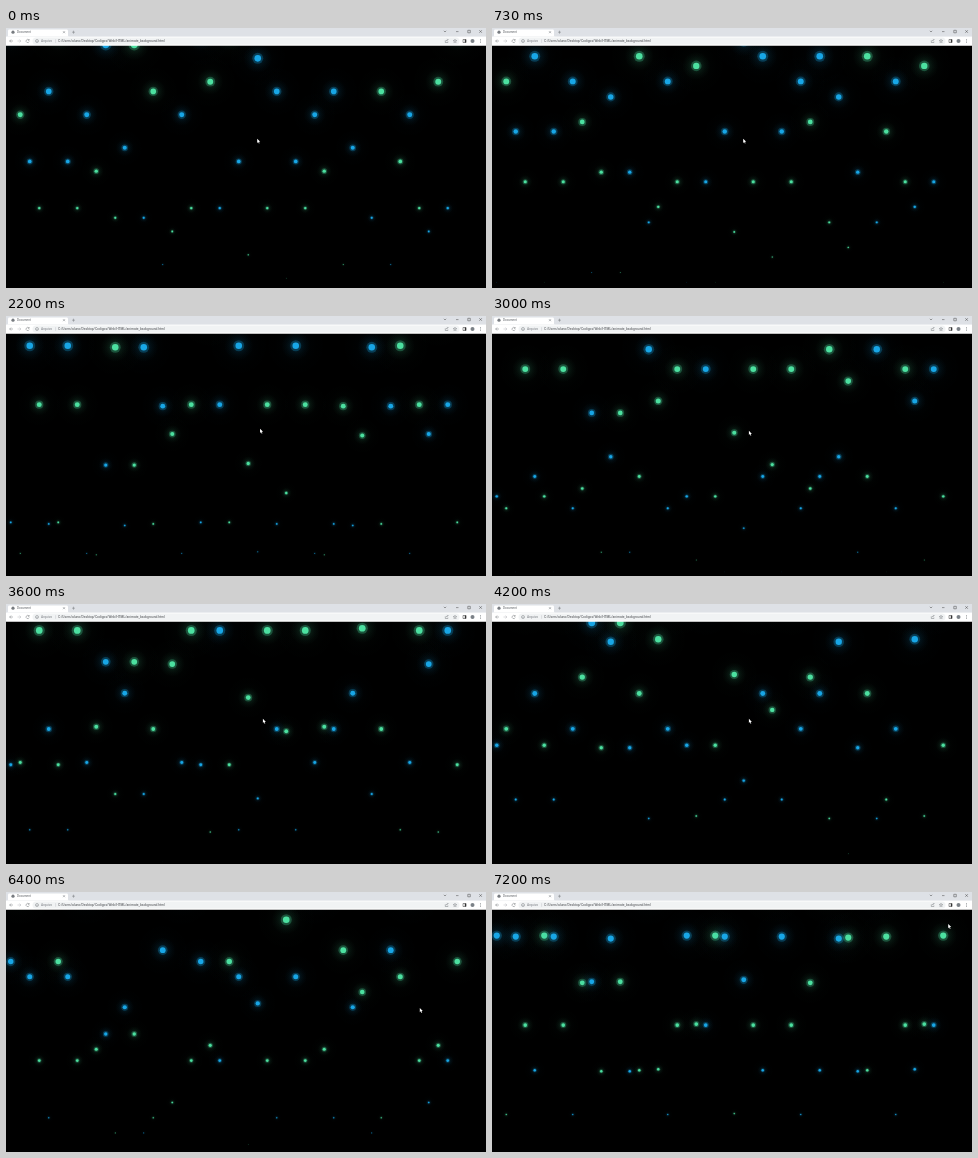
An HTML page with a canvas that plays this animation: 480 px wide and 260 px high, repeating every 7270 ms.

```html
<!DOCTYPE html>
<html lang="pt">
<head>
<meta charset="utf-8">
<title>Document</title>
<style>
  html, body { margin: 0; width: 100%; height: 100%; overflow: hidden; background: #000; }
  canvas, svg { position: absolute; left: 0; top: 0; display: block; }
  text { font-family: Roboto, "Open Sans", sans-serif; }
  .line { fill: none; stroke: #74787c; stroke-width: .5; }
</style>
</head>
<body>
<canvas id="stage" width="480" height="260"></canvas>
<svg width="480" height="18" viewBox="0 0 480 18">
  <rect width="480" height="17.75" fill="#fff"/>
  <rect width="480" height="8.6" fill="#dee1e6"/>
  <path d="M1 8.6Q2 8.6 2 7.6V3Q2 1.6 3.4 1.6H60.6Q62 1.6 62 3V7.6Q62 8.6 63 8.6Z" fill="#fff"/>
  <circle cx="7" cy="4.2" r="1.6" fill="#777b80"/>
  <text x="11" y="5.3" font-size="3" fill="#55595d">Document</text>
  <path class="line" d="M57 3.2l2 2m0-2l-2 2M66 4.2h3m-1.5-1.5v3"/>
  <path class="line" style="stroke:#444" d="M437.8 2.8l1.2 1.2 1.2-1.2M450 3.6h2.5M461.8 2.3h2.5v2.5h-2.5zM473.3 2.2l2.6 2.6m0-2.6l-2.6 2.6"/>
  <rect x="26.5" y="9.6" width="427" height="7" rx="3.5" fill="#f1f3f4"/>
  <path class="line" d="M7 13H3.6m1.5-1.5L3.6 13l1.5 1.5"/>
  <path class="line" style="stroke:#b4b7ba" d="M11.5 13h3.4m-1.5-1.5l1.5 1.5-1.5 1.5"/>
  <path class="line" d="M23 12.1a1.6 1.6 0 1 0 .2 1.4M23.2 11v1.3h-1.3"/>
  <circle class="line" cx="31" cy="13" r="1.5"/>
  <path class="line" d="M31 12.8v1.1"/>
  <text x="35" y="14.2" font-size="3.3" fill="#7a7e83">Arquivo</text>
  <path class="line" style="stroke:#c4c7ca" d="M49.6 11.2v3.6"/>
  <text x="52" y="14.2" font-size="3.3" fill="#45474b">C:/Users/aluno/Desktop/Codigos/Web/HTML/animate_background.html</text>
  <path class="line" d="M439.3 12.3v2.2h2.6v-1M440.2 13.2q.2-1.5 1.9-1.5m-.8-.8l.8.8-.8.8"/>
  <path class="line" d="M449 11.3l.5 1.1 1.2.1-.9.8.3 1.2-1.1-.6-1.1.6.3-1.2-.9-.8 1.2-.1z"/>
  <path class="line" style="stroke:#333" d="M457 11.5h3v3h-3z"/>
  <path d="M458.8 11.5h1.3v3h-1.3z" fill="#333"/>
  <circle cx="466.5" cy="13" r="2" fill="#7b8187"/>
  <path class="line" style="stroke-width:.8;stroke-linecap:round;stroke-dasharray:0 1.4" d="M474.6 11.6v2.9"/>
</svg>
<script>
  const ctx = document.getElementById('stage').getContext('2d');
  const LOOP = 7270, FPS = 15;
  const CYCLE = 90;          // seconds for a bubble of speed 1
  const OFFSET = 7.743;      // seconds already run when the loop begins
  const TOP = 17.75, VIEW = 242.25;
  const PITCH = 9.5, RADIUS = 3.75;
  const COLORS = ['24,166,230', '76,224,160'];

  // The row of bubble speeds repeats, with a few of them varied
  const row = (a, b, c, d, e, f, g, h, i) =>
    [a, b, c, 15, 20, d, 17, 15, 19, 28, e, f, 29, g, 26, 20, 24, h, 19, 15, i, 9, 15, 11];
  const speeds = [
    ...row(11, 19, 17, 11, 22, 26, 22, 14, 11),
    ...row(17, 13, 10, 12, 20, 24, 23, 17, 14)
  ];

  // Pointer moves: it glides to each place, starting at the given second
  const GLIDE = 0.8;
  const home = { x: 251.2, y: 110.7 };
  const moves = [
    { at: 1.8, x: 256.9, y: 114.8 },
    { at: 4.4, x: 212, y: 157.6 },
    { at: 5.5, x: 413.8, y: 116 },
    { at: 6.4, x: 456.2, y: 32 }
  ];

  function disc(x, y, r, fill) {
    ctx.fillStyle = fill;
    ctx.beginPath();
    ctx.arc(x, y, r, 0, 2 * Math.PI);
    ctx.fill();
  }

  function glow(x, y, sigma, alpha, rgb) {
    const reach = 2.6, steps = 8;
    const g = ctx.createRadialGradient(x, y, 0, x, y, sigma * reach);
    for (let i = 0; i <= steps; i++) {
      const d = i / steps * reach;
      const a = i < steps ? alpha * Math.exp(-d * d / 2) : 0;
      g.addColorStop(i / steps, `rgba(${rgb},${a})`);
    }
    disc(x, y, sigma * reach, g);
  }

  // A bubble grows from nothing below the view to full size above it
  function bubble(k, time) {
    const p = speeds[k] * time / CYCLE % 1;
    if (p < 0.005) return;
    const x = PITCH * (k + 0.5);
    const y = TOP + RADIUS + VIEW * (1 - 1.1 * p);
    const r = RADIUS * p;
    const rgb = COLORS[k % 2];
    glow(x, y, r * 3.4, 0.03, rgb);
    glow(x, y, r * 1.7, 0.165, rgb);
    disc(x, y, r * 5 / 3, `rgba(${rgb},.267)`);
    disc(x, y, r, `rgb(${rgb})`);
  }

  function pointer(t) {
    let { x, y } = home;
    for (const m of moves) {
      const u = Math.min(1, Math.max(0, (t - m.at) / GLIDE));
      const e = u * u * (3 - 2 * u);
      x += (m.x - x) * e;
      y += (m.y - y) * e;
    }
    ctx.save();
    ctx.translate(x, y);
    ctx.fillStyle = '#fff';
    ctx.fill(new Path2D('M0 0V4.2L1 3.3 1.7 4.9 2.4 4.6 1.7 3.1H3Z'));
    ctx.restore();
  }

  function draw(now) {
    const frame = Math.floor((now % LOOP + 5) * FPS / 1000);
    const t = Math.max(frame / FPS, 0.14);
    ctx.fillStyle = '#000';
    ctx.fillRect(0, 0, 480, 260);
    for (let k = 0; k < speeds.length; k++) bubble(k, t + OFFSET);
    pointer(t);
  }

  const start = performance.now();
  function tick() {
    draw(performance.now() - start);
    requestAnimationFrame(tick);
  }
  tick();
</script>
</body>
</html>
```
